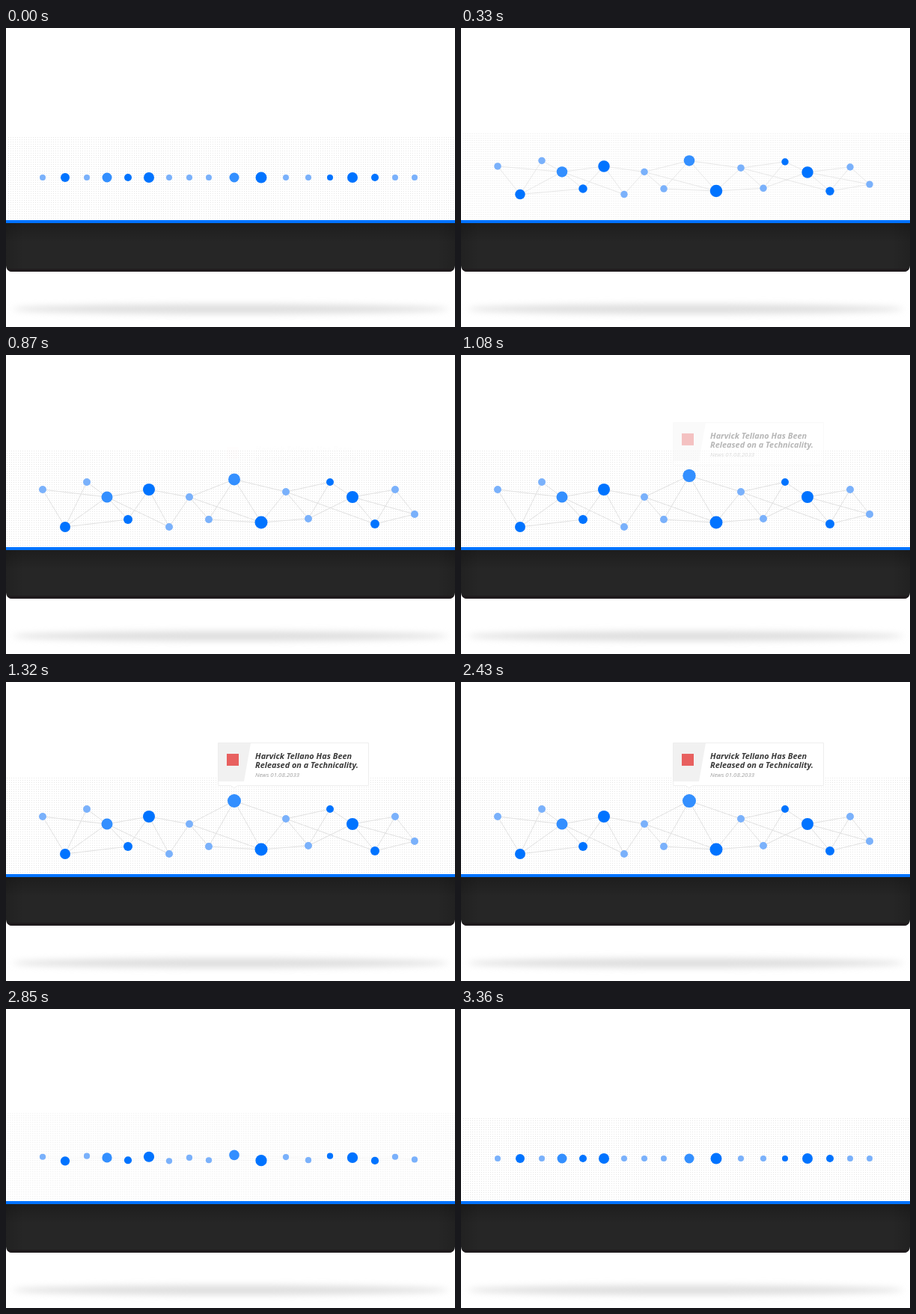
These frames come from a looping animation (600x400 px, 3.6 s). An HTML page with a canvas:

```html
<!DOCTYPE html>
<html lang="en">
<head>
<meta charset="utf-8">
<title>Node network</title>
<style>
html, body { margin: 0; width: 100%; height: 100%; overflow: hidden; background: #fff; }
canvas { display: block; width: 600px; height: 400px; }
</style>
</head>
<body>
<canvas id="stage" width="600" height="400"></canvas>
<script>
const ctx = document.getElementById('stage').getContext('2d');
const LOOP = 3600, STEP = 30, AXIS = 200, FLOOR = 257;
const BLUE = '#0073ff', MID = '#338fff', LIGHT = '#7ab1fb';
const LIFTED = 9;

// x, offset from the axis, radius when spread, colour
const nodes = [
  [49, -20, 5, LIGHT], [79, 30, 7, BLUE], [108, -30, 5, LIGHT],
  [135, -10, 7.5, MID], [163, 20, 6, BLUE], [191, -20, 8, BLUE],
  [218, 30, 5, LIGHT], [245, -10, 5, LIGHT], [271, 20, 5, LIGHT],
  [305, -30, 7.5, MID], [341, 24, 8.5, BLUE], [374, -17, 5, LIGHT],
  [404, 19, 5, LIGHT], [433, -30, 5, BLUE], [463, -10, 8, BLUE],
  [493, 26, 6, BLUE], [520, -20, 5, LIGHT], [546, 13, 5, LIGHT]
];

// neighbours with a higher index, per node
const links = [
  [1, 3], [2, 3, 4], [3], [4, 5, 6], [5], [6, 7], [7], [8, 9, 10], [9, 10],
  [10, 11], [11, 12], [12, 13, 15], [13, 14], [14], [15, 16, 17], [16, 17], [17]
];

const clamp = v => Math.min(1, Math.max(0, v));
const phase = (t, start, length) => clamp((t - start) / length);
const sineOut = u => Math.sin(u * Math.PI / 2);
const quadInOut = u => u < 0.5 ? 2 * u * u : 1 - 2 * (1 - u) ** 2;
const lateIn = u => u ** 2.4;

function makeGrid() {
  const cell = document.createElement('canvas');
  cell.width = cell.height = 3;
  const c = cell.getContext('2d');
  c.fillStyle = '#e6e6e6';
  c.fillRect(0, 0, 1, 1);
  return ctx.createPattern(cell, 'repeat');
}
const grid = makeGrid();

function drawGrid(spread) {
  const x = 3 - 2 * spread, y = 146 - 18 * spread;
  ctx.save();
  ctx.translate(x, y);
  ctx.fillStyle = grid;
  ctx.fillRect(0, 0, 600 - x, FLOOR - y);
  ctx.restore();
}

function polygon(points) {
  ctx.beginPath();
  points.forEach(([x, y]) => ctx.lineTo(x, y));
  ctx.closePath();
}

function shade(x0, y0, x1, y1, alpha) {
  const g = ctx.createLinearGradient(x0, y0, x1, y1);
  g.addColorStop(0, `rgba(0,0,0,${alpha})`);
  g.addColorStop(1, 'rgba(0,0,0,0)');
  ctx.fillStyle = g;
  ctx.fillRect(0, 261, 600, 61);
}

function drawBase() {
  ctx.save();
  ctx.filter = 'blur(4px)';
  ctx.fillStyle = '#dedede';
  ctx.beginPath();
  ctx.ellipse(300, 376, 291, 6.5, 0, 0, Math.PI * 2);
  ctx.fill();
  ctx.restore();

  ctx.save();
  ctx.beginPath();
  ctx.roundRect(0, FLOOR, 600, 69, [0, 0, 8, 8]);
  ctx.clip();
  ctx.fillStyle = '#262626';
  ctx.fillRect(0, FLOOR, 600, 69);
  shade(0, 261, 0, 287, 0.22);
  shade(0, 0, 24, 0, 0.12);
  shade(600, 0, 576, 0, 0.12);
  ctx.fillStyle = '#1f1b1d';
  ctx.fillRect(0, 322, 600, 4);
  ctx.fillStyle = BLUE;
  ctx.fillRect(0, FLOOR, 600, 4);
  ctx.restore();
}

function drawNetwork(spreadOf, lift) {
  const placed = nodes.map(([x, dy, r, color], i) => {
    const p = spreadOf(i);
    const hero = i === 9 ? lift : 0;
    return {
      x, color,
      y: AXIS + dy * p - 11 * hero,
      r: r - 1 + p + (LIFTED - r) * hero
    };
  });

  ctx.globalAlpha = spreadOf(0);
  ctx.strokeStyle = '#e1e1e1';
  ctx.lineWidth = 1;
  ctx.beginPath();
  links.forEach((ends, i) => ends.forEach(j => {
    ctx.moveTo(placed[i].x, placed[i].y);
    ctx.lineTo(placed[j].x, placed[j].y);
  }));
  ctx.stroke();
  ctx.globalAlpha = 1;

  for (const n of placed) {
    ctx.fillStyle = n.color;
    ctx.beginPath();
    ctx.arc(n.x, n.y, n.r, 0, Math.PI * 2);
    ctx.fill();
  }
}

function label(text, y, font, color) {
  ctx.font = font;
  ctx.fillStyle = color;
  ctx.fillText(text, 333, y);
}

function drawCard(p) {
  if (p <= 0) return;
  ctx.save();
  ctx.globalAlpha = p ** 4;
  ctx.translate(0, 40 * (1 - p));

  polygon([[283.5, 81.5], [484.5, 81.5], [484.5, 138.5], [309.5, 138.5],
           [305, 142], [300.5, 138.5], [283.5, 138.5]]);
  ctx.fillStyle = '#fff';
  ctx.fill();
  ctx.strokeStyle = '#eeeeee';
  ctx.lineWidth = 1;
  ctx.stroke();

  polygon([[284, 82], [327, 82], [318, 133], [284, 133]]);
  ctx.fillStyle = '#f1f1f1';
  ctx.fill();

  ctx.fillStyle = '#e8605f';
  ctx.fillRect(295, 96, 16, 16);

  const title = 'italic 700 10.9px "Open Sans", sans-serif';
  label('Harvick Tellano Has Been', 103, title, '#383838');
  label('Released on a Technicality.', 115, title, '#383838');
  label('News 01.08.2033', 127, 'italic 400 7.9px "Open Sans", sans-serif', '#a0a0a0');
  ctx.restore();
}

function draw(t) {
  const stay = 1 - quadInOut(phase(t, 2415, 570));
  const spreadOf = i => sineOut(phase(t, i > 12 ? 28 : 0, 610)) * stay;
  const lift = sineOut(phase(t, 745, 590)) * stay;
  const gridSpread = lateIn(phase(t, 30, 510)) - lateIn(phase(t, 2430, 510));

  ctx.fillStyle = '#fff';
  ctx.fillRect(0, 0, 600, 400);
  drawGrid(gridSpread);
  drawNetwork(spreadOf, lift);
  drawBase();
  drawCard(lift);
}

const begin = performance.now();
function tick() {
  const t = (performance.now() - begin) % LOOP;
  draw(Math.floor(t / STEP) * STEP);
  requestAnimationFrame(tick);
}
tick();
</script>
</body>
</html>
```
